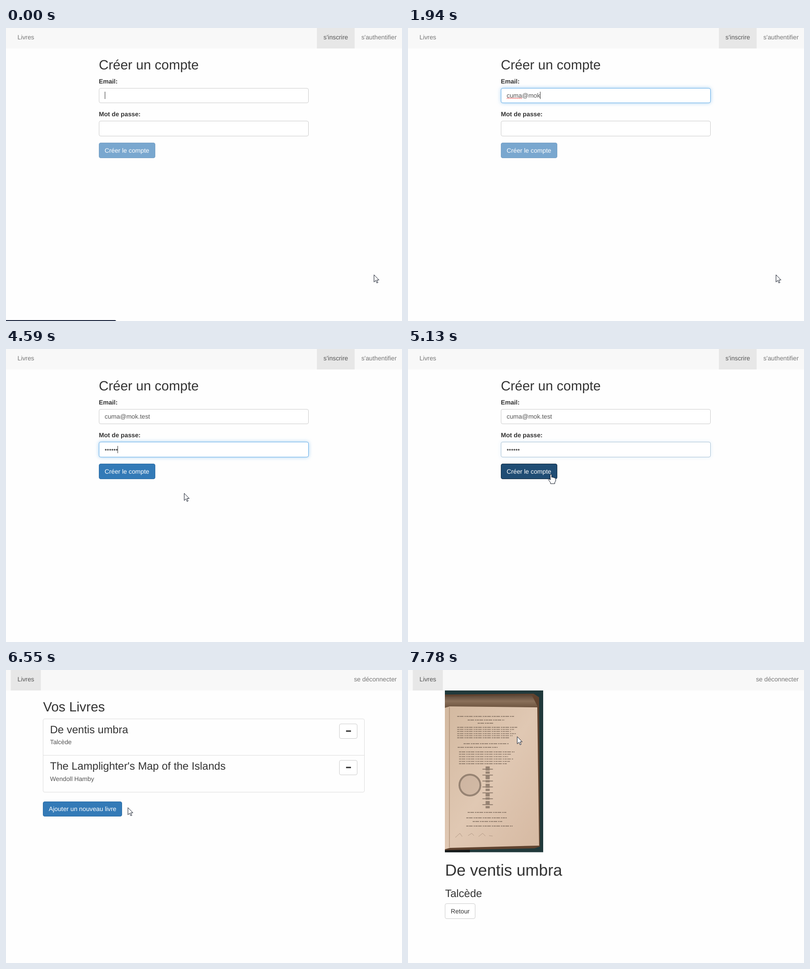
These frames come from a looping animation (870x644 px, 8000 ms). An HTML page:

```html
<!DOCTYPE html>
<html lang="fr">
<head>
<meta charset="utf-8">
<title>Livres</title>
<style>
  html, body { margin: 0; width: 100%; height: 100%; overflow: hidden; background: #fefefe; }
  svg { display: block; }
  text {
    font: 13.75px "Liberation Sans", Arial, sans-serif;
    text-rendering: geometricPrecision;
    white-space: pre;
    fill: #555;
  }
  .h1 { font-size: 35.35px; fill: #333; }
  .h2 { font-size: 29.46px; fill: #333; }
  .h3 { font-size: 23.57px; fill: #333; }
  .label { font-weight: bold; fill: #333; }
  .dark { fill: #333; }
  .nav { fill: #777; }
  .active { fill: #e7e7e7; }
  .field { fill: #fff; stroke: #ccc; }
  .focus { fill: #fff; stroke: #66afe9; filter: drop-shadow(0 0 4px rgba(102, 175, 233, .6)); }
  .primary { fill: #337ab7; stroke: #2e6da4; }
  .primary.hover { fill: #286090; stroke: #204d74; }
  .primary.press { fill: #204d74; stroke: #122b40; }
  .white { fill: #fff; }
  .row { fill: #fefefe; }
  .row.hover { fill: #f5f5f5; }
  .frame { fill: none; stroke: #ddd; }
</style>
</head>
<body>
<svg width="870" height="644" viewBox="0 0 870 644">
  <defs>
    <linearGradient id="paper" x2="1" y2="1">
      <stop offset="0" stop-color="#d3b9a0"/>
      <stop offset=".5" stop-color="#e0c8b3"/>
      <stop offset="1" stop-color="#d6b9a2"/>
    </linearGradient>
    <linearGradient id="edge" x2="0" y2="1">
      <stop offset="0" stop-color="#5a4738"/>
      <stop offset=".5" stop-color="#8a705a"/>
      <stop offset="1" stop-color="#6e5540"/>
    </linearGradient>
  </defs>
  <rect width="870" height="644" fill="#fefefe"/>
  <rect width="870" height="45" fill="#f8f8f8"/>

  <g id="signup">
    <rect class="active" x="683" width="83" height="45"/>
    <text class="nav" x="25.3" y="25.3">Livres</text>
    <text x="697.6" y="25.3">s'inscrire</text>
    <text class="nav" x="780.7" y="25.3">s'authentifier</text>
    <text class="h2" x="204" y="91.3">Créer un compte</text>
    <text class="label" x="204" y="122">Email:</text>
    <rect class="field" x="204.5" y="132.5" width="460" height="32" rx="3.5"/>
    <rect class="focus" id="emailFocus" x="204.5" y="132.5" width="460" height="32" rx="3.5"/>
    <text id="email" x="216.8" y="153"></text>
    <path id="squiggle" fill="none" stroke="#e33" stroke-width="1"/>
    <text class="label" x="204" y="194.4">Mot de passe:</text>
    <rect class="field" x="204.5" y="204.5" width="460" height="33" rx="3.5"/>
    <rect class="focus" id="passFocus" x="204.5" y="204.5" width="460" height="33" rx="3.5"/>
    <text id="pass" x="216.8" y="226"></text>
    <rect id="caret" width="1" height="16" fill="#333"/>
    <g id="submit">
      <rect class="primary" id="submitBox" x="204.5" y="252.5" width="123" height="33" rx="3.5"/>
      <text class="white" x="216.8" y="274">Créer le compte</text>
    </g>
  </g>

  <g id="member">
    <rect class="active" x="10.6" width="66" height="45"/>
    <text x="25.3" y="25.3">Livres</text>
    <text class="nav" x="764.4" y="25.3">se déconnecter</text>
  </g>

  <g id="books">
    <text class="h2" x="81.4" y="91.3">Vos Livres</text>
    <rect class="row" id="row0" x="82" y="108" width="705" height="80"/>
    <rect class="row" id="row1" x="82" y="188" width="705" height="80"/>
    <path class="frame" d="M82 187.5H787"/>
    <rect class="frame" x="81.5" y="107.5" width="706" height="161" rx="3.5"/>
    <text class="h3" x="96.8" y="138.7">De ventis umbra</text>
    <text x="96.8" y="163">Talcède</text>
    <text class="h3" x="96.8" y="219.2">The Lamplighter's Map of the Islands</text>
    <text x="96.8" y="243.5">Wendoll Hamby</text>
    <g id="minus">
      <rect class="field" x="732.5" y="118.5" width="39" height="32" rx="3.5"/>
      <rect x="747" y="132.7" width="11" height="3" rx=".6" fill="#333"/>
    </g>
    <use href="#minus" y="80"/>
    <rect class="primary" id="addBox" x="81.5" y="289.5" width="173" height="32" rx="3.5"/>
    <text class="white" x="94.1" y="310.3">Ajouter un nouveau livre</text>
  </g>

  <g id="detail">
    <g id="photo">
      <rect x="81" y="45" width="216" height="355.5" fill="#20393b"/>
      <path d="M81 391H136V400.5H81Z" fill="#15191a"/>
      <path d="M81 54 276 52 288 60 290 388 278 392 81 396Z" fill="#60432f"/>
      <path d="M81 58 272 55 285 81 81 82Z" fill="url(#edge)"/>
      <path d="M81 83 92 80 284 82 288 386 92 391 81 394Z" fill="url(#paper)"/>
      <path d="M91 82V390" stroke="#a98a70" stroke-width="1.2"/>
      <g fill="none" stroke="#5e4e42" opacity=".55">
        <path id="print" stroke-width="1.8" stroke-dasharray="5 1 8 2 3 1"/>
        <path d="M175 212V307" stroke-width="9" stroke-dasharray="9 2 5 3"/>
        <path d="M175 217V304" stroke-width="23" stroke-dasharray="2 11"/>
        <circle cx="136" cy="253" r="23" stroke-width="4" fill="#5e4e42" fill-opacity=".2"/>
      </g>
      <path d="M104 368l10-9 5 7M132 364l8-5 5 5M155 366l9-7 6 6M178 364l8 1" fill="none" stroke="#b39a86"/>
    </g>
    <text class="h1" x="81.4" y="452.3">De ventis umbra</text>
    <text class="h3" x="81.4" y="499">Talcède</text>
    <rect class="field" x="81.5" y="513.5" width="66" height="33" rx="3.5"/>
    <text class="dark" x="94.1" y="535">Retour</text>
  </g>

  <rect id="status" x="-5" y="642" height="20" rx="3" fill="#16203a"/>

  <g id="pointer" fill="#fff" stroke="#111827" stroke-linejoin="round">
    <path id="arrow" d="M.5.5V16.3L4.2 12.8 6.7 18.4 9.1 17.4 6.6 11.9H11.5Z"/>
    <path id="hand" d="M-1.5 13V1.5Q0-.8 1.5 1.5V7Q3.5 5.8 4.5 7.5 6.5 6.5 7.5 8.3 10.5 7.5 10.5 10.5V15L8.5 18V21H-1V18.5L-5.5 12.5Q-5.5 9.5-3 11Z"/>
  </g>
</svg>
<script>
const LOOP = 8000, TICK = 200 / 3, TEXT_X = 216.8;
const EMAIL = 'cuma@mok.test';

// [time, characters typed]
const emailKeys = [[1000, 1], [1135, 3], [1330, 4], [1400, 5], [1670, 6], [1800, 7],
  [1940, 8], [2610, 9], [2870, 11], [2930, 12], [3000, 13]];
const passKeys = [[3470, 1], [3600, 2], [3660, 3], [3870, 4], [3990, 5], [4130, 6]];

const easeOut = p => 1 - (1 - p) ** 2.12;
const smooth = p => p * p * (3 - 2 * p);
const linear = p => p;
const moves = [
  { from: 4133, to: 4933, x: 314, y: 275, ease: easeOut },
  { from: 6467, to: 6533, x: 267.5, y: 302, ease: linear },
  { from: 6533, to: 6800, x: 236, y: 299.5, ease: easeOut },
  { from: 7033, to: 7433, x: 239.5, y: 146, ease: smooth }
];

const el = Object.fromEntries([...document.querySelectorAll('[id]')].map(e => [e.id, e]));
const clamp = v => Math.max(0, Math.min(1, v));
const ramp = (t, from, to) => clamp((t - from) / (to - from));
const within = (t, a, b) => t >= a && t < b;
const show = (e, on) => { e.style.display = on ? '' : 'none'; };
const typed = (keys, t) => keys.reduce((n, [at, count]) => t >= at ? count : n, 0);

function pointerAt(t) {
  let x = 808, y = 542;
  for (const m of moves) {
    const p = m.ease(ramp(t, m.from, m.to));
    x += (m.x - x) * p;
    y += (m.y - y) * p;
  }
  return { x, y };
}

function drawPrint() {
  // [first line, line count, spacing, left, right]
  const blocks = [[102, 1, 1, 108, 234], [110, 1, 1, 131, 212], [117, 1, 1, 153, 187],
    [126, 6, 4.6, 108, 240], [162, 1, 1, 122, 222], [170, 1, 1, 109, 197],
    [180, 6, 5.2, 112, 234], [313, 1, 1, 131, 217], [325, 1, 1, 128, 217],
    [333, 1, 1, 142, 207], [343, 1, 1, 128, 230]];
  let d = '';
  for (const [y, n, gap, left, right] of blocks)
    for (let i = 0; i < n; i++) d += `M${left} ${y + i * gap}H${right - i * 7 % 18}`;
  el.print.setAttribute('d', d);
}

function drawSquiggle() {
  let d = `M${TEXT_X} 155.5`;
  for (let i = 0; i < 17; i++) d += `l2 ${i % 2 ? 2 : -2}`;
  el.squiggle.setAttribute('d', d);
}

function render(t) {
  const tick = Math.floor(t / TICK + .2) * TICK;
  const onSignup = t < 5350, onBooks = within(t, 5350, 7650);
  show(el.signup, onSignup);
  show(el.member, !onSignup);
  show(el.books, onBooks);
  show(el.detail, t >= 7650);
  show(el.photo, t >= 7780);

  const { x, y } = pointerAt(tick);
  const overSubmit = onSignup && x < 327 && y < 286;
  const overAdd = onBooks && x < 255 && within(y, 289, 322);
  const row = onBooks && within(y, 108, 268) ? Math.floor((y - 108) / 80) : -1;
  const hand = overSubmit || overAdd || row >= 0;
  el.pointer.setAttribute('transform', `translate(${x} ${y})`);
  show(el.arrow, !hand);
  show(el.hand, hand);

  el.addBox.classList.toggle('hover', overAdd);
  [el.row0, el.row1].forEach((r, i) => r.classList.toggle('hover', i === row));
  el.submitBox.classList.toggle('hover', overSubmit);
  el.submitBox.classList.toggle('press', within(t, 5060, 5200));
  el.submit.style.opacity = t < 4130 ? .65 : 1;

  el.emailFocus.style.opacity = ramp(tick, 0, 200) - ramp(tick, 3133, 3333);
  el.passFocus.style.opacity = ramp(tick, 3133, 3333) - ramp(tick, 5000, 5200);
  el.email.textContent = EMAIL.slice(0, typed(emailKeys, t));
  el.pass.textContent = '•'.repeat(typed(passKeys, t));
  show(el.squiggle, within(t, 1470, 3200));

  const inEmail = t < 3200;
  const blinkedOff = within(t, 540, 1000) || within(t, 2480, 2610) || t >= 4660;
  const field = inEmail ? el.email : el.pass;
  show(el.caret, !blinkedOff);
  if (onSignup) {
    const width = field.textContent ? field.getComputedTextLength() : 0;
    el.caret.setAttribute('x', Math.round(TEXT_X + width - .3));
    el.caret.setAttribute('y', inEmail ? 140 : 213);
  }

  el.status.setAttribute('width', onSignup ? 247 : 291);
  el.status.style.opacity = onSignup
    ? 1 - ramp(tick, 267, 467)
    : 1 - ramp(tick, 5533, 5733);
  show(el.status, t < 540 || within(t, 5350, 5750));
}

drawPrint();
drawSquiggle();
const start = performance.now();
function loop() {
  render((performance.now() - start) % LOOP);
  requestAnimationFrame(loop);
}
loop();
</script>
</body>
</html>
```
